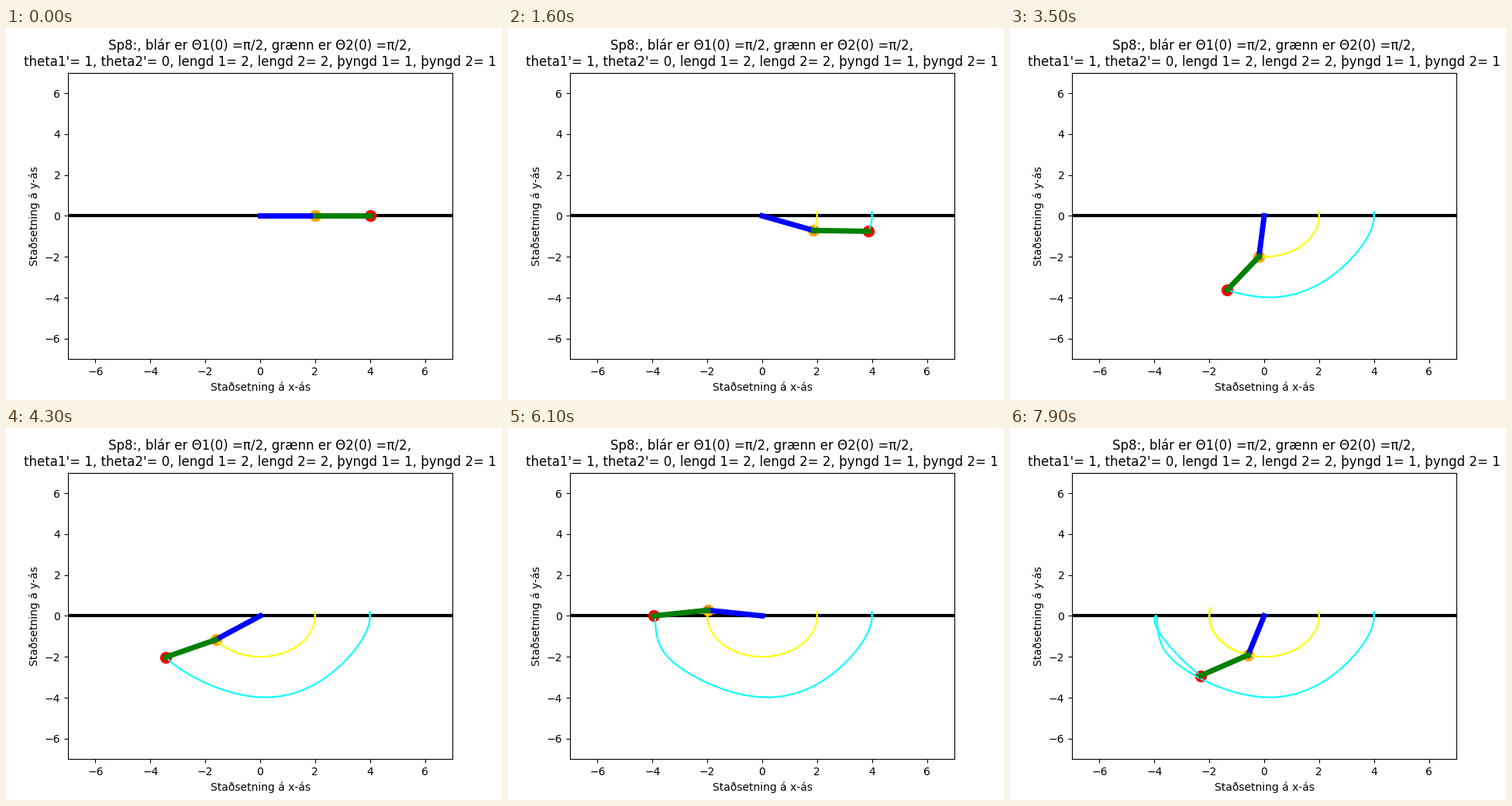
Animation, 640 px wide and 480 px high, one loop 8 s. Source, as a matplotlib script:

```python
import numpy as np
import matplotlib.pyplot as plt
from matplotlib.animation import FuncAnimation

FRAMES, INTERVAL = 80, 100
G, L1, L2, M1, M2 = 9.81, 2, 2, 1, 1
DT = 4 / 99      # simulated seconds per frame
SUBSTEPS = 20


def rates(s):
    """Time derivative of (theta1, omega1, theta2, omega2)."""
    t1, w1, t2, w2 = s
    d = t1 - t2
    den = 2 * M1 + M2 - M2 * np.cos(2 * d)
    a1 = (-G * (2 * M1 + M2) * np.sin(t1) - M2 * G * np.sin(t1 - 2 * t2)
          - 2 * np.sin(d) * M2 * (w2**2 * L2 + w1**2 * L1 * np.cos(d))) / (L1 * den)
    a2 = 2 * np.sin(d) * (w1**2 * L1 * (M1 + M2) + G * (M1 + M2) * np.cos(t1)
                          + w2**2 * L2 * M2 * np.cos(d)) / (L2 * den)
    return np.array([w1, a1, w2, a2])


def rk4(s, h):
    k1 = rates(s)
    k2 = rates(s + h / 2 * k1)
    k3 = rates(s + h / 2 * k2)
    k4 = rates(s + h * k3)
    return s + h / 6 * (k1 + 2 * k2 + 2 * k3 + k4)


def simulate():
    s = np.array([np.pi / 2, 1, np.pi / 2, 0])
    states = [s]
    for _ in range(FRAMES - 1):
        for _ in range(SUBSTEPS):
            s = rk4(s, DT / SUBSTEPS)
        states.append(s)
    return np.array(states)


t1, _, t2, _ = simulate().T
x1, y1 = L1 * np.sin(t1), -L1 * np.cos(t1)
x2, y2 = x1 + L2 * np.sin(t2), y1 - L2 * np.cos(t2)

fig, ax = plt.subplots(figsize=(6.4, 4.8), dpi=100)
ax.set(xlim=(-7, 7), ylim=(-7, 7),
       xlabel="Staðsetning á x-ás", ylabel="Staðsetning á y-ás")
ax.set_title("Sp8:, blár er Θ1(0) =π/2, grænn er Θ2(0) =π/2,\n"
             "theta1'= 1, theta2'= 0, lengd 1= 2, lengd 2= 2, "
             "þyngd 1= 1, þyngd 2= 1")

ax.plot([-7, 7], [0, 0], color="black", lw=3)
bob1, = ax.plot([], [], "o", color="orange", ms=10)
bob2, = ax.plot([], [], "o", color="red", ms=10)
trail1, = ax.plot([], [], color="yellow")
trail2, = ax.plot([], [], color="cyan")
rod1, = ax.plot([], [], color="blue", lw=5)
rod2, = ax.plot([], [], color="green", lw=5)


def update(i):
    bob1.set_data([x1[i]], [y1[i]])
    bob2.set_data([x2[i]], [y2[i]])
    trail1.set_data(x1[:i + 1], y1[:i + 1])
    trail2.set_data(x2[:i + 1], y2[:i + 1])
    rod1.set_data([0, x1[i]], [0, y1[i]])
    rod2.set_data([x1[i], x2[i]], [y1[i], y2[i]])
    return bob1, bob2, trail1, trail2, rod1, rod2


anim = FuncAnimation(fig, update, frames=FRAMES, interval=INTERVAL,
                     repeat=True, repeat_delay=0)
plt.show()
```
